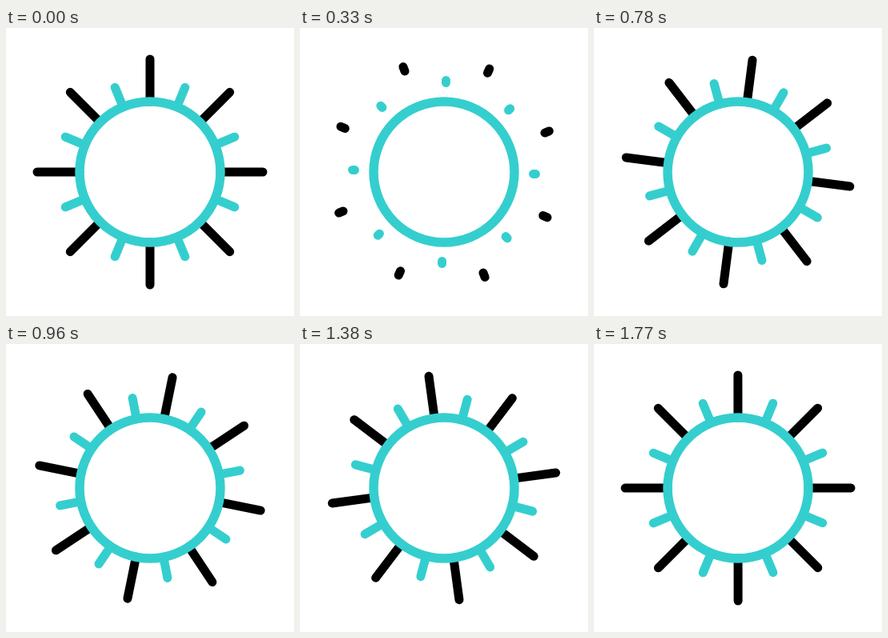
An HTML page with a canvas that plays this animation: 360x360 px, repeating every 1.8 s.

```html
<!DOCTYPE html>
<html lang="en">
<head>
<meta charset="utf-8">
<title>Sun</title>
<style>
  html, body { margin: 0; height: 100%; overflow: hidden; background: #fff; }
  canvas { display: block; }
</style>
</head>
<body>
<canvas id="stage" width="360" height="360"></canvas>
<script>
const ctx = document.getElementById('stage').getContext('2d');
const LOOP = 1800, STEP = 36, STEPS = 50;
const TURN = 19.7;   // step at which the sun swings back
const SWING = 37.8;  // degrees, counterclockwise
const RING = 88, TEAL = '#35cece';

// Ease-in-out along a Bezier curve with handles (a, 0) and (b, 1)
function ease(x, a, b) {
  let lo = 0, hi = 1;
  for (let i = 0; i < 24; i++) {
    const u = (lo + hi) / 2, v = 1 - u;
    if (3 * u * v * v * a + 3 * u * u * v * b + u ** 3 < x) lo = u;
    else hi = u;
  }
  return lo * lo * (3 - 2 * lo);
}

function angleAt(k) {
  return k < TURN
    ? -SWING * ease(k / TURN, 0.43, 0.375)
    : -SWING * (1 - ease((k - TURN) / (STEPS - TURN), 0.4, 0.4));
}

// 0 to 1: rays leave outwards; 1 to 2: they grow out of the ring again
function travelAt(k) {
  const x = Math.min(k / TURN, 1);
  return 2 * (x - 0.27 * Math.sin(2 * Math.PI * x) / (2 * Math.PI));
}

function rays(color, tip, turn, travel) {
  const tail = travel < 1 ? travel : 0;
  const head = travel < 1 ? 1 : travel - 1;
  if (head - tail < 0.001) return;
  const radius = f => RING + (tip - RING) * f;
  ctx.strokeStyle = color;
  for (let i = 0; i < 8; i++) {
    const a = (turn + i * 45) * Math.PI / 180;
    const x = Math.sin(a), y = -Math.cos(a);
    ctx.beginPath();
    ctx.moveTo(x * radius(tail), y * radius(tail));
    ctx.lineTo(x * radius(head), y * radius(head));
    ctx.stroke();
  }
}

function draw(now) {
  const k = Math.floor(now % LOOP / STEP);
  const turn = angleAt(k), travel = travelAt(k);
  ctx.setTransform(1, 0, 0, 1, 0, 0);
  ctx.fillStyle = '#fff';
  ctx.fillRect(0, 0, 360, 360);
  ctx.translate(180, 180);
  ctx.lineCap = 'round';
  ctx.lineWidth = 11;
  rays('#000', 141, turn, travel);
  rays(TEAL, 114.5, turn + 22.5, travel);
  ctx.strokeStyle = TEAL;
  ctx.lineWidth = 11.5;
  ctx.beginPath();
  ctx.arc(0, 0, RING, 0, 2 * Math.PI);
  ctx.stroke();
}

const start = performance.now();
function tick() {
  draw(performance.now() - start);
  requestAnimationFrame(tick);
}
tick();
</script>
</body>
</html>
```
